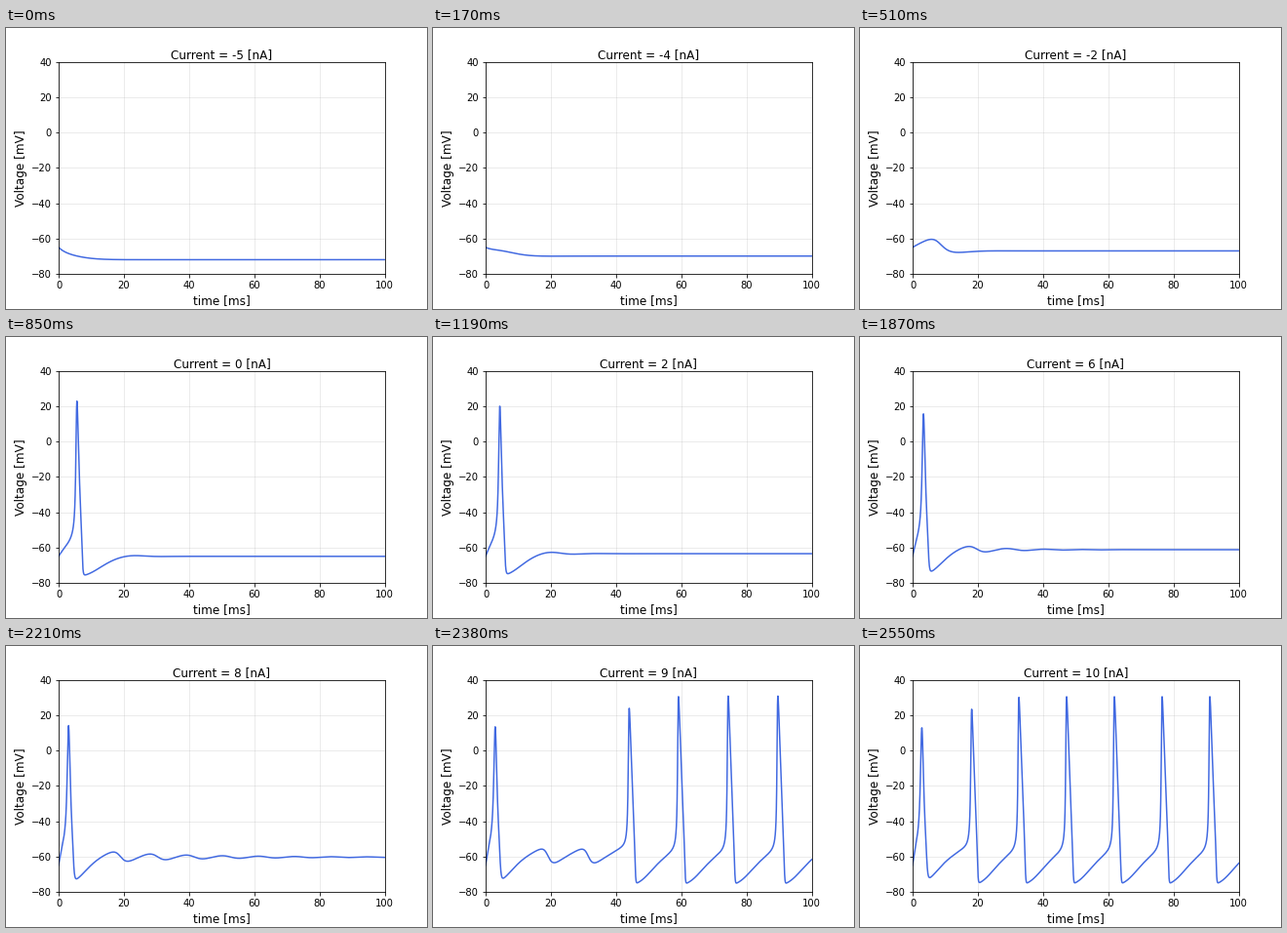
Animation, 432 px wide and 288 px high, one loop 2720 ms. Source, as a matplotlib script:

```python
import numpy as np
import matplotlib.pyplot as plt
from matplotlib.animation import FuncAnimation

CURRENTS = np.arange(-5, 11)
DT, T_END = 0.02, 100.0
G_NA, G_K, G_L = 120.0, 36.0, 0.3
E_NA, E_K, E_L = 50.0, -77.0, -54.387


def derivatives(state):
    """Hodgkin-Huxley equations, one column per injected current."""
    v, m, h, n = state
    a_m = 0.1 * (v + 40) / (1 - np.exp(-(v + 40) / 10))
    b_m = 4 * np.exp(-(v + 65) / 18)
    a_h = 0.07 * np.exp(-(v + 65) / 20)
    b_h = 1 / (1 + np.exp(-(v + 35) / 10))
    a_n = 0.01 * (v + 55) / (1 - np.exp(-(v + 55) / 10))
    b_n = 0.125 * np.exp(-(v + 65) / 80)
    ionic = (G_NA * m**3 * h * (v - E_NA)
             + G_K * n**4 * (v - E_K)
             + G_L * (v - E_L))
    return np.array([
        CURRENTS - ionic,
        a_m * (1 - m) - b_m * m,
        a_h * (1 - h) - b_h * h,
        a_n * (1 - n) - b_n * n,
    ])


def simulate():
    """Integrate with RK4 from -65 mV with every gate closed."""
    time = np.arange(0, T_END + DT / 2, DT)
    state = np.zeros((4, len(CURRENTS)))
    state[0] = -65.0
    voltage = np.empty((len(time), len(CURRENTS)))
    for i in range(len(time)):
        voltage[i] = state[0]
        k1 = derivatives(state)
        k2 = derivatives(state + DT / 2 * k1)
        k3 = derivatives(state + DT / 2 * k2)
        k4 = derivatives(state + DT * k3)
        state = state + DT / 6 * (k1 + 2 * k2 + 2 * k3 + k4)
    return time, voltage


time, voltage = simulate()

plt.rcParams.update({"font.family": "DejaVu Sans", "font.size": 10})
fig, ax = plt.subplots(figsize=(6, 4), dpi=72)
fig.subplots_adjust(left=0.125, right=0.9, bottom=0.125, top=0.88)

line, = ax.plot([], [], color="royalblue", lw=1.5)
ax.set_xlim(0, 100)
ax.set_ylim(-80, 40)
ax.set_xlabel("time [ms]", fontsize=12)
ax.set_ylabel("Voltage [mV]", fontsize=12)
ax.grid(alpha=0.3)
title = ax.set_title("", fontsize=12, pad=4)


def update(frame):
    line.set_data(time, voltage[:, frame])
    title.set_text(f"Current = {CURRENTS[frame]} [nA]")
    return line, title


anim = FuncAnimation(fig, update, frames=len(CURRENTS), interval=170,
                     repeat=True, repeat_delay=0, blit=False)
plt.show()
```
